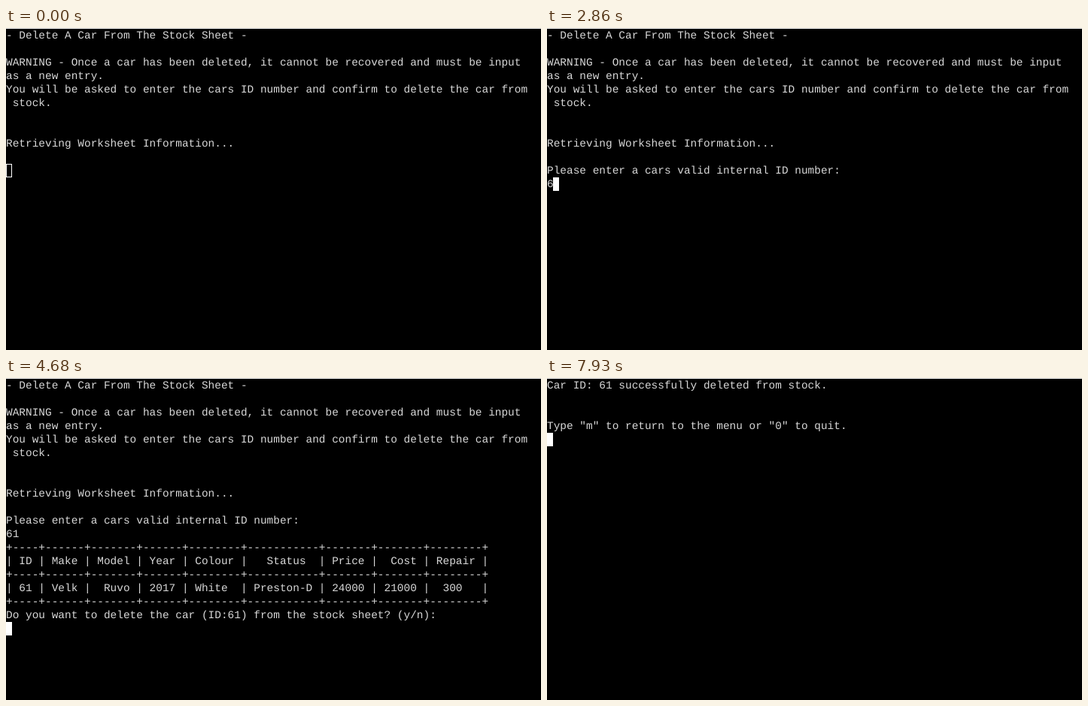
An HTML page that plays this animation: 711 by 429 pixels, repeating every 8000 ms.

```html
<!DOCTYPE html>
<html lang="en">
<head>
<meta charset="utf-8">
<title>Stock sheet terminal</title>
<style>
  html, body { margin: 0; width: 100%; height: 100%; overflow: hidden; background: #000; }
  #stage { position: relative; width: 711px; height: 429px; overflow: hidden; }
  #edge { position: absolute; width: 100%; height: 1px; background: #fff; }
  #screen {
    position: absolute; left: 0; top: 2px; margin: 0; color: #d8d8d8;
    font: 14.44px/18px "Courier New", "Liberation Mono", monospace;
    text-rendering: geometricPrecision;
  }
  #caret { position: absolute; box-sizing: border-box; width: 8px; height: 18px; border: 1px solid #fff; }
  #caret.focused { background: #fff; }
  #pointer { position: absolute; left: 0; top: 0; fill: #f4f4f4; }
</style>
</head>
<body>
<div id="stage">
  <div id="edge"></div>
  <pre id="screen"></pre>
  <div id="caret"></div>
  <svg id="pointer" width="12" height="20"><path d="M0 0V16L3.7 12.6 6 18 8.4 17 6.1 11.6H10.6Z"/></svg>
</div>
<script>
const LOOP = 8000, CELL = 8.66, ROW = 18;
const $ = id => document.getElementById(id);

const intro = `- Delete A Car From The Stock Sheet -

WARNING - Once a car has been deleted, it cannot be recovered and must be input
as a new entry.
You will be asked to enter the cars ID number and confirm to delete the car from
 stock.


Retrieving Worksheet Information...

`;
const prompt = intro + "Please enter a cars valid internal ID number:\n";
const rule = "+" + [4, 6, 7, 6, 8, 11, 7, 7, 8].map(n => "-".repeat(n) + "+").join("");
const question = prompt + [
  "61",
  rule,
  "| ID | Make | Model | Year | Colour |   Status  | Price |  Cost | Repair |",
  rule,
  "| 61 | Velk |  Ruvo | 2017 | White  | Preston-D | 24000 | 21000 |  300   |",
  rule,
  "Do you want to delete the car (ID:61) from the stock sheet? (y/n):",
  ""
].join("\n");
const done = 'Car ID: 61 successfully deleted from stock.\n\n\nType "m" to return to the menu or "0" to quit.\n';

// [start time, terminal text]; the caret always follows the text
const screens = [
  [0, intro], [680, prompt], [2860, prompt + "6"], [3060, prompt + "61"],
  [3500, prompt + "61\n"], [4000, question], [5600, question + "y"],
  [6100, ""], [6890, done]
];
// [start time, x, y] of the pointer tip
const pointerStops = [[110, 345, 264], [210, 337, 225], [510, 331, 221], [680, 330, 219]];
const FOCUS_TIME = 510, POINTER_HIDDEN = 2860;

const latest = (list, t) => list.filter(item => item[0] <= t).pop();

function draw(t) {
  const text = latest(screens, t)[1];
  if ($("screen").textContent !== text) $("screen").textContent = text;

  const lines = text.split("\n");
  const caret = $("caret");
  caret.style.left = Math.floor(lines.at(-1).length * CELL) + "px";
  caret.style.top = 1 + (lines.length - 1) * ROW + "px";
  caret.classList.toggle("focused", t >= FOCUS_TIME);

  const stop = t < POINTER_HIDDEN && latest(pointerStops, t);
  const pointer = $("pointer");
  pointer.style.display = stop ? "block" : "none";
  if (stop) pointer.style.transform = `translate(${stop[1]}px, ${stop[2]}px)`;
}

const start = performance.now();
function tick() {
  draw((performance.now() - start) % LOOP);
  requestAnimationFrame(tick);
}
tick();
</script>
</body>
</html>
```
